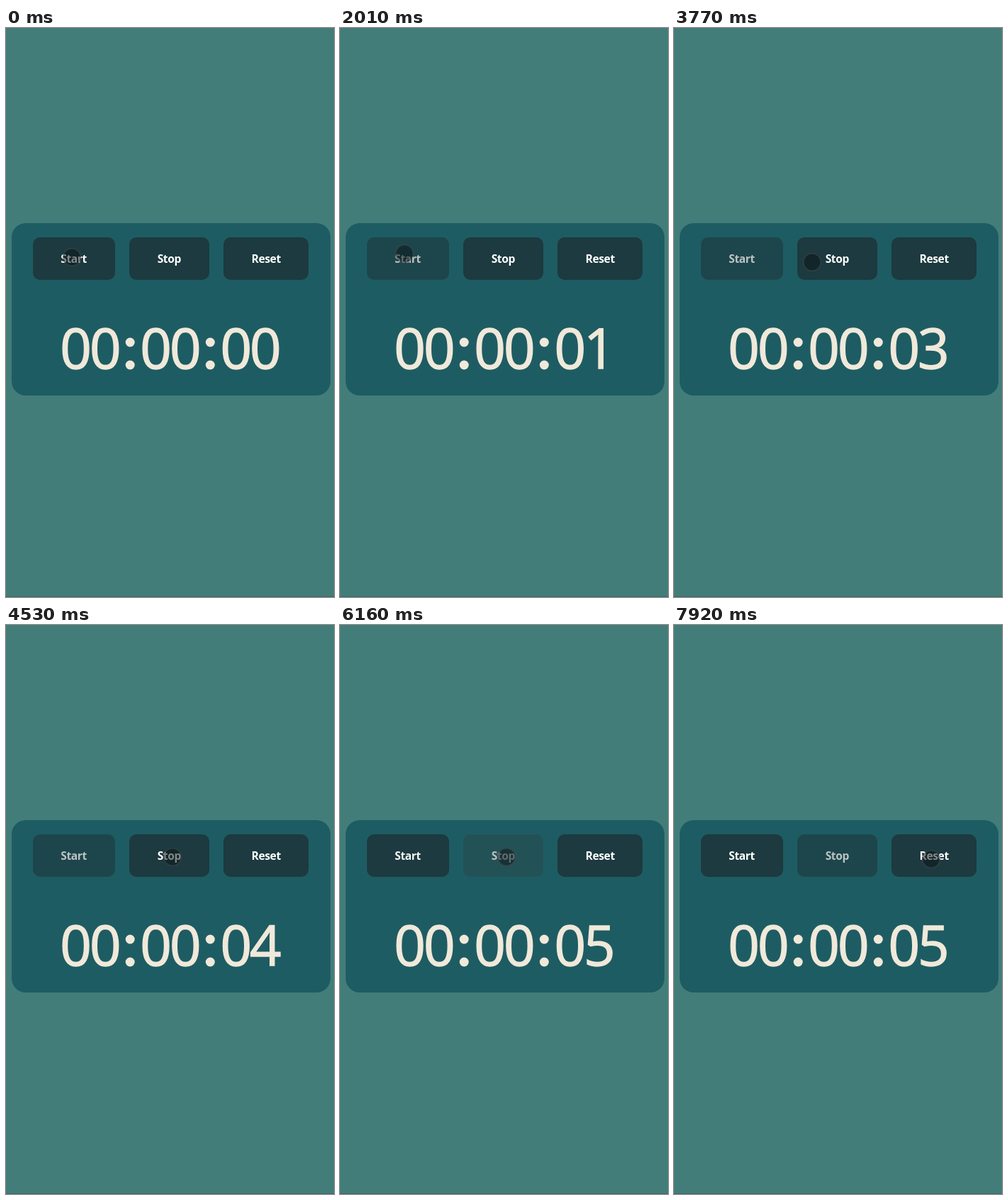
Write an HTML page that moves like this. It is 463 by 802 pixels and loops after 8 s.

```html
<!DOCTYPE html>
<html lang="en">
<head>
<meta charset="utf-8">
<title>Stopwatch</title>
<style>
  html, body { margin: 0; width: 100%; height: 100%; overflow: hidden; background: #427d7a; }
  svg { display: block; }
  .stage { width: 463px; height: 802px; }

  text { font-family: "Open Sans", "Noto Sans", sans-serif; text-anchor: middle; }
  .time { font-size: 78px; fill: #f0e9da; stroke: #f0e9da; stroke-width: 1.4px; }
  .dots { fill: #f0e9da; }
  .button rect { fill: #1c3a3f; rx: 10px; }
  .button text { font-size: 15.6px; font-weight: 700; fill: #fff; letter-spacing: -.4px; }
  .cursor { fill: rgba(8, 18, 22, .5); stroke: rgba(72, 76, 78, .45); stroke-width: 2px; }

  .start text, .start rect, .stop text, .stop rect, .cursor, .strip { animation: 8s step-end infinite; }
  .start text { animation-name: start-label; }
  .start rect { animation-name: start-press; }
  .stop text { animation-name: stop-label; }
  .stop rect { animation-name: stop-press; }
  .cursor { animation-name: move; }
  .strip { animation-name: count; }

  @keyframes start-label {
    0% { fill: #fff; }
    7.75% { fill: #b9cdd5; }
    9.375%, 72.375% { fill: #bdc2c3; }
    73.875% { fill: #dce2e3; }
    75.5% { fill: #f3f5f5; }
    77.125%, 100% { fill: #fff; }
  }
  @keyframes start-press {
    0% { fill: #1c3a3f; rx: 10px; }
    6.25% { fill: #2e829a; rx: 0px; }
    7.75% { fill: #2c7c92; rx: 0px; }
    9.375% { fill: #235256; rx: 10px; }
    11% { fill: #1f4b50; rx: 10px; }
    12.5%, 72.375% { fill: #1d464c; rx: 10px; }
    73.875% { fill: #1d4247; rx: 10px; }
    75.5%, 100% { fill: #1c3a3f; rx: 10px; }
  }
  @keyframes stop-label {
    0% { fill: #fff; }
    73.875% { fill: #b9cdd5; }
    75.5%, 100% { fill: #bdc2c3; }
  }
  @keyframes stop-press {
    0% { fill: #1c3a3f; rx: 10px; }
    72.375% { fill: #2e829a; rx: 0px; }
    73.875% { fill: #2c7c92; rx: 0px; }
    75.5% { fill: #235256; rx: 10px; }
    77.125% { fill: #1f4b50; rx: 10px; }
    78.625%, 100% { fill: #1d464c; rx: 10px; }
  }
  @keyframes move {
    0% { transform: translate(93px, 323px); }
    1.625% { transform: translate(92px, 318px); }
    25.125% { transform: translate(91px, 318px); }
    34.5% { transform: translate(95px, 320px); }
    36.125% { transform: translate(101px, 323px); }
    37.625% { transform: translate(109px, 326px); }
    39.25% { transform: translate(119px, 328px); }
    40.75% { transform: translate(131px, 330px); }
    42.375% { transform: translate(146px, 331px); }
    44% { transform: translate(161px, 331px); }
    45.5% { transform: translate(178px, 331px); }
    47.125% { transform: translate(195px, 330px); }
    48.625% { transform: translate(211px, 329px); }
    50.25% { transform: translate(223px, 328px); }
    51.75% { transform: translate(230px, 328px); }
    55.125% { transform: translate(233px, 327px); }
    56.625% { transform: translate(235px, 327px); }
    89.625% { transform: translate(247px, 327px); }
    91.25% { transform: translate(264px, 328px); }
    92.75% { transform: translate(286px, 329px); }
    94.375% { transform: translate(311px, 330px); }
    95.875% { transform: translate(335px, 330px); }
    97.5% { transform: translate(353px, 330px); }
    99%, 100% { transform: translate(363px, 330px); }
  }
  @keyframes count {
    0% { transform: translateY(0); }
    20.375% { transform: translateY(-100px); }
    31.375% { transform: translateY(-200px); }
    44% { transform: translateY(-300px); }
    56.625% { transform: translateY(-400px); }
    69.25%, 100% { transform: translateY(-500px); }
  }
</style>
</head>
<body>
<svg class="stage" viewBox="0 0 463 802">
  <rect width="463" height="802" fill="#427d7a"/>
  <rect y="801" width="463" height="1" fill="#3a6665"/>
  <rect x="8" y="275" width="450" height="243" rx="20" fill="#1e5c63"/>

  <g class="button start">
    <rect x="38" y="295" width="116" height="60"/>
    <text x="95.6" y="331">Start</text>
  </g>
  <g class="button stop">
    <rect x="174" y="295" width="113" height="60"/>
    <text x="230.3" y="331">Stop</text>
  </g>
  <g class="button">
    <rect x="307" y="295" width="120" height="60"/>
    <text x="367.2" y="331">Reset</text>
  </g>

  <text class="time" x="98.5 140.3 211.5 253.3 324.7" y="479.6">00000</text>
  <g class="dots">
    <circle cx="175.2" cy="443" r="6.5"/>
    <circle cx="175.2" cy="475" r="6.5"/>
    <circle cx="288.3" cy="443" r="6.5"/>
    <circle cx="288.3" cy="475" r="6.5"/>
  </g>
  <svg x="340" y="405" width="60" height="90" overflow="hidden">
    <g class="time strip">
      <text x="26.3" y="74.6">0</text>
      <text x="26.3" y="174.6">1</text>
      <text x="26.3" y="274.6">2</text>
      <text x="26.3" y="374.6">3</text>
      <text x="26.3" y="474.6">4</text>
      <text x="26.3" y="574.6">5</text>
    </g>
  </svg>

  <circle class="cursor" r="12.3"/>
</svg>
</body>
</html>
```
